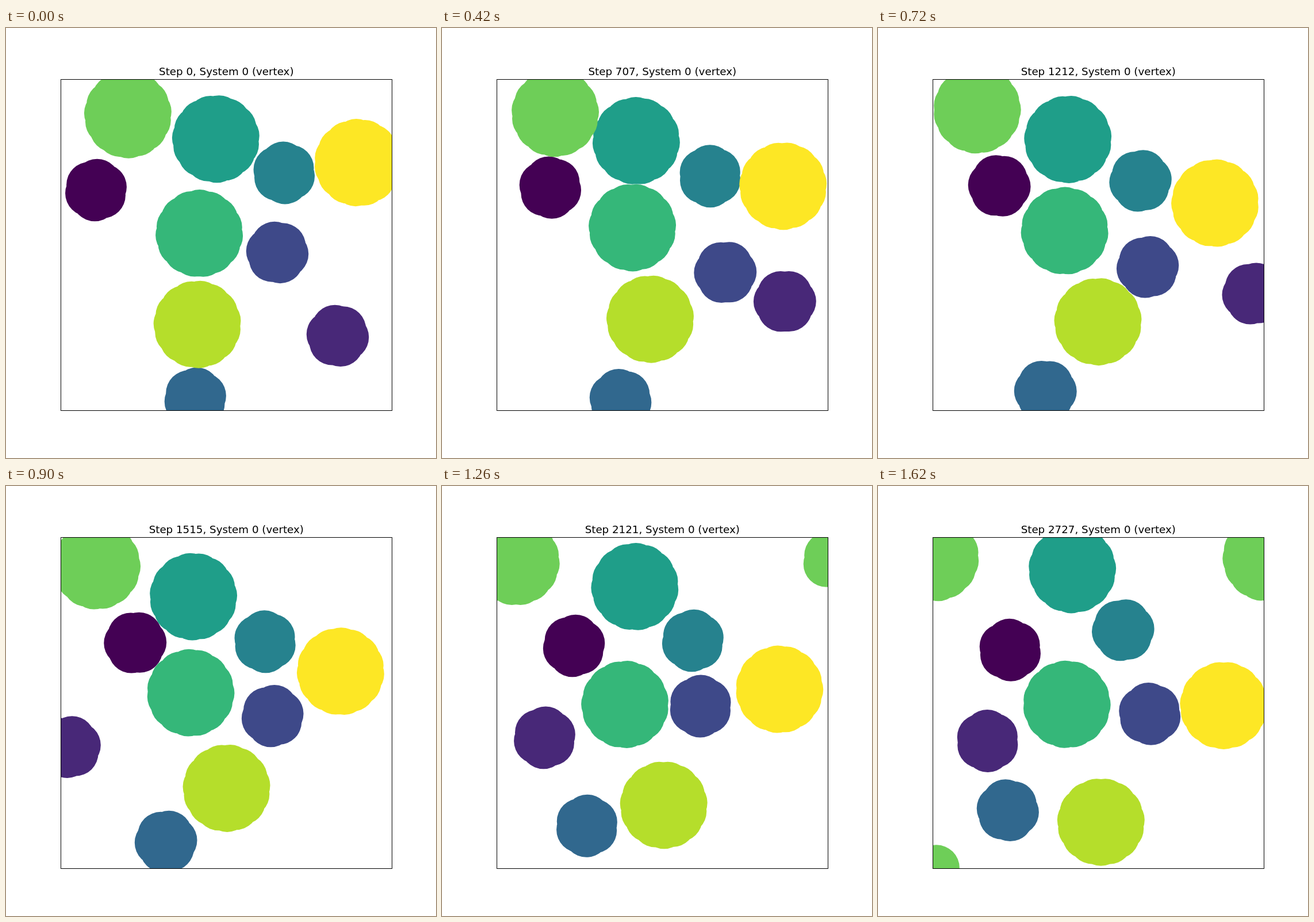
Recreate the animation shown at these times as an HTML page. Size 748 by 748 pixels, loop 1680 ms.

```html
<!DOCTYPE html>
<html lang="en">
<head>
<meta charset="utf-8">
<title>Rigid clumps in a periodic box</title>
<style>
  html, body { margin: 0; height: 100%; overflow: hidden; background: #fff; }
  svg { display: block; width: 100vw; height: 100vh; }
  text { font: 18.25px "DejaVu Sans", sans-serif; text-anchor: middle; }
</style>
</head>
<body>
<svg viewBox="0 0 748 748">
  <clipPath id="box"><rect x="95" y="90" width="577" height="576"/></clipPath>
  <g id="clumps" clip-path="url(#box)"></g>
  <rect x="95.5" y="89.5" width="576" height="576" fill="none" stroke="#000"/>
  <text id="title" x="383.3" y="82"></text>
</svg>
<script>
const LEFT = 95.35, TOP = 89.76, SIZE = 575.96;
const DISK = 40.1;
const TICK = 60, TICKS = 28, STEPS_PER_TICK = 101;
const SMALL = { ring: 14.4, count: 6 };
const LARGE = { ring: 36.1, count: 15 };

const layer = document.getElementById('clumps');
const title = document.getElementById('title');
const clumps = [];

// turn: starting angle, spin: degrees per tick, bounces: [tick, x, y].
// Between bounces a clump flies straight at constant speed.
function clump(kind, color, turn, spin, ...bounces) {
  const path = document.createElementNS('http://www.w3.org/2000/svg', 'path');
  path.setAttribute('fill', color);
  layer.append(path);
  clumps.push({ ...kind, path, turn, spin, bounces });
}

clump(SMALL, '#440154', 8, -2.7, [0, 156.5, 282], [16, 229.3, 272], [27, 229.8, 285.3]);
clump(SMALL, '#482878', -20, -1.55, [0, 577, 535.3], [6.5, 590.7, 476.9], [23, 777, 432.5],
  [27, 766.5, 443.5]);
clump(SMALL, '#3e4989', -20, -1.8, [0, 472, 390.5], [6.5, 495.3, 425.8], [11.5, 470, 418.3],
  [19, 456.5, 379.5], [23, 442.8, 386.5], [27, 472.7, 396.4]);
clump(SMALL, '#31688e', 70, -3.2, [0, 329.3, 644.7], [8.5, 306.5, 647.6], [27, 225.8, 564.2]);
clump(SMALL, '#26828e', 54, -7.9, [0, 483.8, 252], [7, 466.4, 257.8], [19, 442.7, 277.3],
  [23, 429.9, 260.7], [27, 426.3, 250.8]);
clump(LARGE, '#1f9e89', -15, 2, [0, 365, 193], [7, 337.8, 196.2], [15.5, 325.2, 192.2],
  [23, 339.2, 168.8], [27, 338, 145.2]);
clump(LARGE, '#35b779', 1, -2, [0, 336.2, 357.3], [8, 330.4, 345.8], [14, 321.8, 356.3],
  [23, 317.3, 386.8], [27, 328.5, 379.8]);
clump(LARGE, '#6ece58', 10, 0.65, [0, 212, 150.6], [7, 196.9, 148.2], [27, 99.5, 124.5]);
clump(LARGE, '#b5de2b', 8, 0.15, [0, 332.8, 515.6], [10.3, 376, 502.2], [12, 382.6, 511],
  [27, 387.8, 584.6]);
clump(LARGE, '#fde725', -5, -1.15, [0, 612.5, 234.2], [7, 593.3, 275], [17.4, 578.6, 336.6],
  [27, 601.3, 381.9]);

function centreAt(bounces, tick) {
  const i = Math.max(1, bounces.findIndex(b => b[0] >= tick));
  const [t0, x0, y0] = bounces[i - 1], [t1, x1, y1] = bounces[i];
  const u = (tick - t0) / (t1 - t0);
  return [x0 + (x1 - x0) * u, y0 + (y1 - y0) * u];
}

const wrap = (v, start) => start + ((v - start) % SIZE + SIZE) % SIZE;

function disk(x, y) {
  return `M${(x - DISK).toFixed(2)} ${y.toFixed(2)}` +
    `a${DISK} ${DISK} 0 1 0 ${2 * DISK} 0a${DISK} ${DISK} 0 1 0 ${-2 * DISK} 0z`;
}

// Every vertex disk wraps around the box on its own.
function outline({ ring, count, turn, spin, bounces }, tick) {
  const [x, y] = centreAt(bounces, tick);
  let d = '';
  for (let i = 0; i < count; i++) {
    const a = (turn + spin * tick - 90 + i * 360 / count) * Math.PI / 180;
    d += disk(wrap(x + ring * Math.cos(a), LEFT), wrap(y + ring * Math.sin(a), TOP));
  }
  return d;
}

let shown = -1;
function draw(tick) {
  if (tick === shown) return;
  shown = tick;
  title.textContent = `Step ${tick * STEPS_PER_TICK}, System 0 (vertex)`;
  for (const c of clumps) c.path.setAttribute('d', outline(c, tick));
}

const start = performance.now();
function loop() {
  draw(Math.floor((performance.now() - start) / TICK) % TICKS);
  requestAnimationFrame(loop);
}
loop();
</script>
</body>
</html>
```
